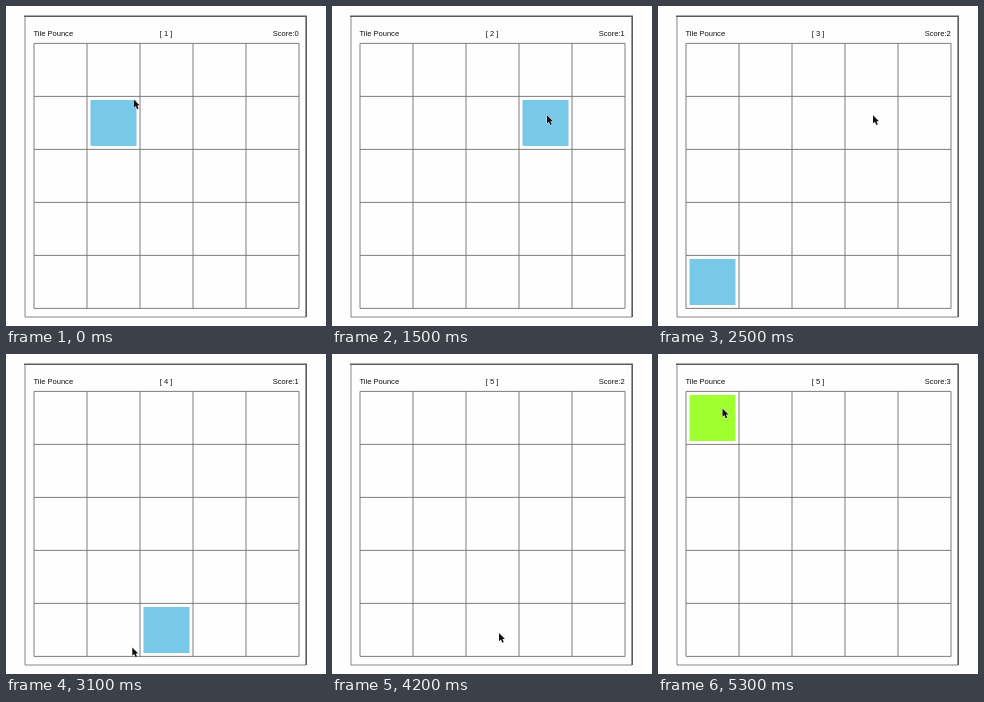
An HTML page for the animation above (5.4 s loop, 320 by 320 pixels).

```html
<!DOCTYPE html>
<html lang="en">
<head>
<meta charset="utf-8">
<title>Tile Pounce</title>
<style>
  html, body { margin: 0; width: 100%; height: 100%; overflow: hidden; background: #fefefe; }
  svg { display: block; width: 100%; height: 100%; }
  text { font: 7.55px "Liberation Sans", Arial, sans-serif; fill: #111; }
</style>
</head>
<body>
<svg viewBox="0 0 320 320">
  <path d="M19 10V311H300" fill="none" stroke="#858585"/>
  <path d="M18 10.2H300.2V311" fill="none" stroke="#5c5c5c" stroke-width="1.6"/>
  <text x="27.5" y="30">Tile Pounce</text>
  <text id="round" x="160" y="30" text-anchor="middle"></text>
  <text id="score" x="292.8" y="30" text-anchor="end"></text>
  <path id="grid" fill="none" stroke="#707070" stroke-width=".9"/>
  <rect id="tile" width="46" height="46"/>
  <path id="cursor" d="M0 0V8.2L1.9 6.5 3.3 9.7 4.8 9 3.4 5.9H6Z"
        fill="#111" stroke="#fff" stroke-width=".8" paint-order="stroke"/>
</svg>
<script>
const LOOP = 5400, STEP = 100, CELL = 53, LEFT = 28, TOP = 37.4;
const BLUE = '#78c8e9', GREEN = '#a0ff2f', NONE = 'none';

// Game state from each time on: time, round, score, column, row, colour
const states = [
  [0, 1, 0, 1, 1, BLUE],
  [300, 1, 1, 1, 1, GREEN],
  [1000, 2, 1, 3, 1, NONE],
  [1100, 2, 1, 3, 1, BLUE],
  [1600, 2, 2, 3, 1, GREEN],
  [2500, 3, 2, 0, 4, BLUE],
  [3100, 4, 1, 2, 4, BLUE],
  [3400, 4, 2, 2, 4, GREEN],
  [4200, 5, 2, 0, 0, NONE],
  [4300, 5, 2, 0, 0, BLUE],
  [5100, 5, 3, 0, 0, GREEN]
];

// Pointer waypoints: time, x, y
const moves = [
  [0, 127.8, 93.5], [300, 119.5, 102.5], [700, 119, 103.3], [1000, 119, 103.3],
  [1250, 155, 195], [1500, 215, 109.3], [2500, 215, 109.3],
  [3100, 126.3, 293.5], [3400, 167, 279], [4600, 167, 279], [5100, 64.5, 54.5]
];

const el = id => document.getElementById(id);
const lastBefore = (list, t) => list.findLastIndex(item => item[0] <= t);

function pointerAt(t) {
  const i = lastBefore(moves, t);
  const [t0, x0, y0] = moves[i];
  const [t1, x1, y1] = moves[i + 1] || [LOOP, x0, y0];
  const u = (t - t0) / (t1 - t0);
  const k = u * u * (3 - 2 * u);
  return [x0 + (x1 - x0) * k, y0 + (y1 - y0) * k];
}

function draw(t) {
  const [, round, score, col, row, color] = states[lastBefore(states, t)];
  el('round').textContent = `[ ${round} ]`;
  el('score').textContent = `Score:${score}`;
  el('tile').setAttribute('x', LEFT + 3.5 + col * CELL);
  el('tile').setAttribute('y', TOP + 3.6 + row * CELL);
  el('tile').setAttribute('fill', color);
  el('cursor').setAttribute('transform', `translate(${pointerAt(t)})`);
}

let lines = '';
for (let i = 0; i <= 5; i++) {
  const d = i * CELL;
  lines += `M${LEFT + d} ${TOP}v${5 * CELL}M${LEFT} ${TOP + d}h${5 * CELL}`;
}
el('grid').setAttribute('d', lines);

const start = performance.now();
function tick() {
  const t = (performance.now() - start) % LOOP;
  draw(Math.floor(t / STEP) * STEP);
  requestAnimationFrame(tick);
}
tick();
</script>
</body>
</html>
```
